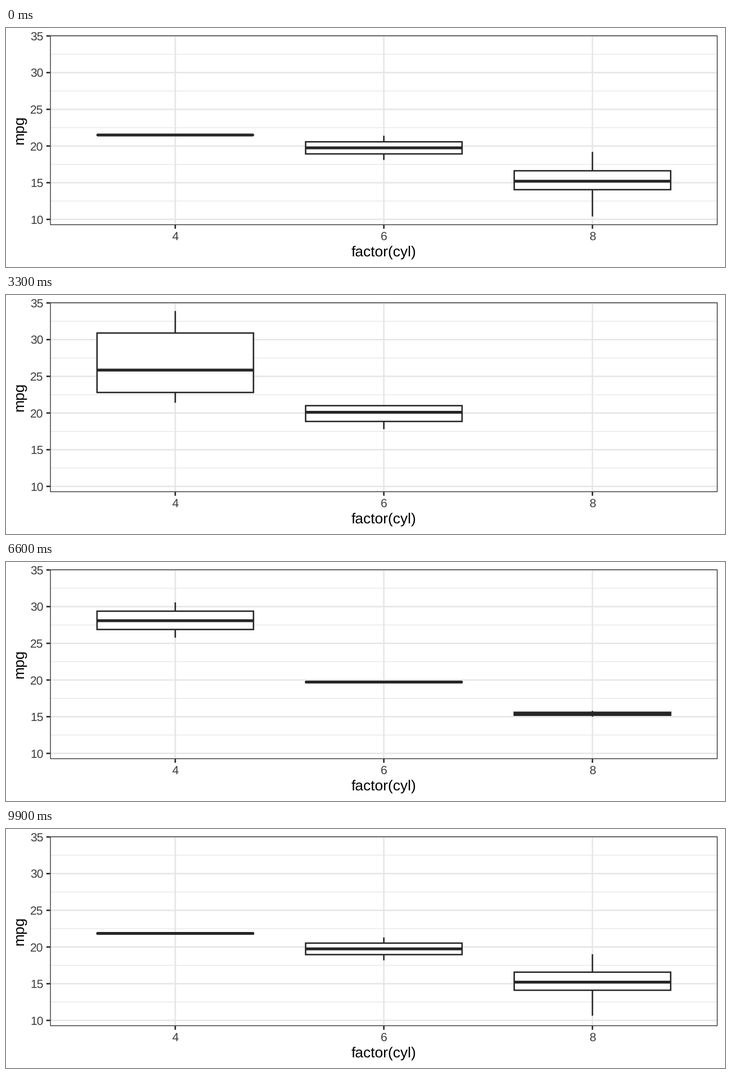
Write a matplotlib script that moves like this. It is 1280 px wide and 427 px high and loops after 10000 ms.

```python
import matplotlib.pyplot as plt
import numpy as np
from matplotlib.animation import FuncAnimation
from matplotlib.patches import Rectangle

W, H, DPI = 1280, 427, 64           # a power of two keeps the size exact
PX = 72 / DPI                       # points per pixel
LEFT, RIGHT, TOP, BOTTOM = 78.5, 1266.8, 13.2, 352.1
Y_MIN, Y_MAX = 9.225, 35.075
DARK, GRID, LABEL = "#262626", "#e6e6e6", "#3c3c3c"
LINE = 2.56
UNIT = (RIGHT - LEFT) / 3.2

# low whisker, lower hinge, median, upper hinge, high whisker per box
STATES = [
    [(21.5,) * 5, (18.1, 18.925, 19.75, 20.575, 21.4),
     (10.4, 14.05, 15.2, 16.625, 19.2)],
    [(21.4, 22.8, 25.85, 30.9, 33.9), (17.8, 18.85, 20.1, 21, 21), None],
    [(26, 27.1, 28.2, 29.3, 30.4), (19.7,) * 5,
     (15, 15.2, 15.4, 15.6, 15.8)],
]
MOVES = [(13, 33), (47, 67), (81, 100)]
SWITCH = 0.575                      # when an unpaired box appears or leaves

plt.rcParams.update({"font.family": "Liberation Sans",
                     "text.hinting": "no_hinting", "path.snap": False})

fig = plt.figure(figsize=(W / DPI, H / DPI), dpi=DPI, facecolor="white")
ax = fig.add_axes([0, 0, 1, 1])
ax.set(xlim=(0, W), ylim=(H, 0))
ax.axis("off")


def to_y(v):
    return BOTTOM - (np.asarray(v) - Y_MIN) / (Y_MAX - Y_MIN) * (BOTTOM - TOP)


def to_x(i):
    return LEFT + (0.6 + i) * UNIT


def line(xs, ys, color, width, z):
    return ax.plot(xs, ys, color=color, lw=width * PX, zorder=z,
                   solid_capstyle="butt", snap=False)[0]


def label(x, y, text, size, color, **kw):
    ax.text(x, y, text, fontsize=size * PX, color=color, **kw)


def block(color, z):
    return ax.add_patch(Rectangle((0, 0), 0, 0, fc=color, lw=0, zorder=z,
                                  snap=False))


class Box:
    def __init__(self, x):
        self.x = x
        self.half = 0.375 * UNIT
        self.whisker = line([x, x], [0, 0], DARK, LINE, 3)
        self.frame = block(DARK, 4)
        self.inside = block("white", 5)
        self.median = line([x - self.half, x + self.half], [0, 0],
                           DARK, 2 * LINE, 6)
        self.parts = [self.whisker, self.frame, self.inside, self.median]

    def update(self, stats):
        for part in self.parts:
            part.set_visible(stats is not None)
        if stats is None:
            return
        low, q1, mid, q3, high = to_y(stats)
        self.whisker.set_ydata([low, high])
        self.median.set_ydata([mid, mid])
        for patch, pad in ((self.frame, LINE / 2), (self.inside, -LINE / 2)):
            height = max(q1 - q3 + 2 * pad, 0)
            patch.set_bounds(self.x - self.half - pad, q3 - pad,
                             2 * (self.half + pad), height)


def draw_panel():
    for v in np.arange(12.5, 35, 5):
        line([LEFT, RIGHT], [to_y(v)] * 2, GRID, LINE / 2, 1)
    for v in range(10, 36, 5):
        y = float(to_y(v))
        line([LEFT, RIGHT], [y, y], GRID, LINE, 2)
        line([LEFT - 6.6, LEFT], [y, y], DARK, LINE, 2)
        label(66.9, y + 7.5, str(v), 21.1, LABEL, ha="right", va="baseline")
    for i, name in enumerate("468"):
        x = to_x(i)
        line([x, x], [TOP, BOTTOM], GRID, LINE, 2)
        line([x, x], [BOTTOM, BOTTOM + 6.6], DARK, LINE, 2)
        label(x, 379.2, name, 21.1, LABEL, ha="center", va="baseline")
    edge = LINE / 2
    ax.add_patch(Rectangle((LEFT + edge / 2, TOP + edge / 2),
                           RIGHT - LEFT - edge, BOTTOM - TOP - edge,
                           fc="none", ec=DARK, lw=edge * PX, zorder=8,
                           snap=False))
    label((LEFT + RIGHT) / 2, 409, "factor(cyl)", 26.4, "black",
          ha="center", va="baseline")
    label(32, (TOP + BOTTOM) / 2, "mpg", 26.4, "black", rotation=90,
          rotation_mode="anchor", ha="center", va="baseline")


def blend(a, b, t):
    if a is None or b is None:
        return b if t > SWITCH else a
    return np.array(a) * (1 - t) + np.array(b) * t


def update(n):
    k = next(i for i, (_, end) in enumerate(MOVES) if n < end)
    start, end = MOVES[k]
    t = max(0, (n - start) / (end - start))
    for box, a, b in zip(boxes, STATES[k], STATES[(k + 1) % 3]):
        box.update(blend(a, b, t))
    return [p for box in boxes for p in box.parts]


draw_panel()
boxes = [Box(to_x(i)) for i in range(3)]
anim = FuncAnimation(fig, update, frames=100, interval=100, repeat=True,
                     repeat_delay=0, init_func=lambda: update(0))
plt.show()
```
